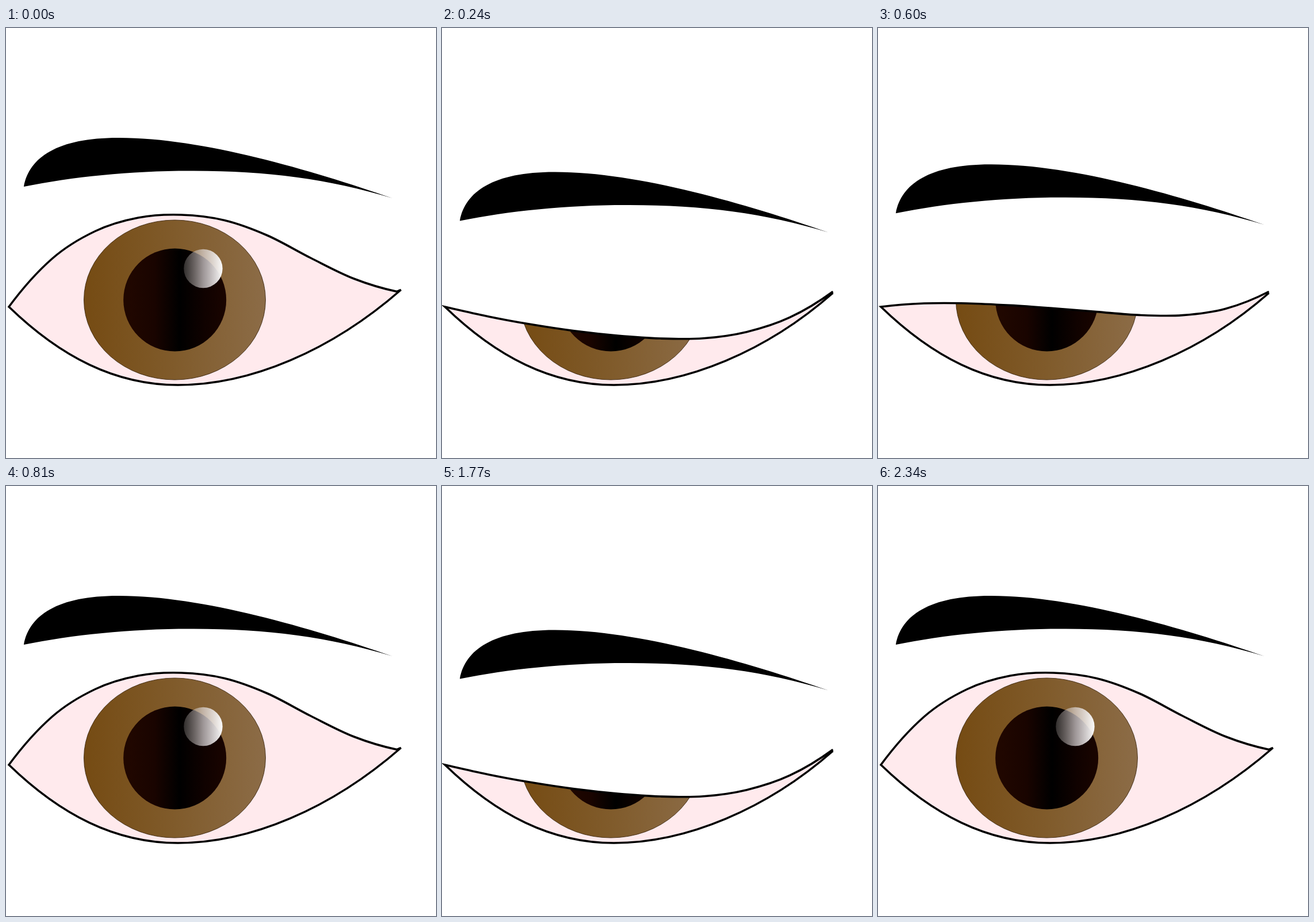
Animation of 748 by 748 pixels, one loop 2850 ms. Source, as an HTML page with a canvas:

```html
<!DOCTYPE html>
<html lang="en">
<head>
<meta charset="utf-8">
<title>Blinking eye</title>
<style>
html, body { margin: 0; height: 100%; overflow: hidden; background: #fff; }
canvas { display: block; }
</style>
</head>
<body>
<canvas id="stage" width="748" height="748"></canvas>
<script>
const ctx = document.getElementById('stage').getContext('2d');
const STEP = 30, LOOP = 2850, SECOND_BLINK = 1530, BROW_DROP = 85.7;

// Upper lid heights at equal distances from the left corner.
const LEFT = 5, GAP = 75;
const OPEN = [485, 401.5, 353.5, 330, 325, 334.5, 361, 400, 436, 458.5];
const SHUT = [484, 545.5, 586.5, 613, 627, 630, 618, 585, 533, 458.5];

const brow = new Path2D(`M31 276C40 225 90 191 195 191C340 190.5 530 247 672 296
  C560 262 450 248 320 248.5C215 248.5 115 259 31 276Z`);

const lowerLid = tip => new Path2D(`M${tip}C565 562 425 621 299 621C190 621 95 572 5 485`);

// How far the lid is down: quick fall, short rest, slower rise.
function closure(n) {
  const p = n < 11 ? n / 11.5 : (27 - n) / 13;
  return Math.max(0, Math.min(1, p));
}

// Smooth curve through the lid heights.
function addUpperLid(path, ys) {
  const last = ys.length - 1;
  const slope = i =>
    i === 0 ? 2 * (ys[1] - ys[0]) - slope(1) :
    i === last ? 2 * (ys[last] - ys[last - 1]) - slope(last - 1) :
    (ys[i + 1] - ys[i - 1]) / 2;
  for (let i = 0; i < last; i++) {
    const x = LEFT + GAP * i;
    path.bezierCurveTo(x + GAP / 3, ys[i] + slope(i) / 3,
      x + GAP * 2 / 3, ys[i + 1] - slope(i + 1) / 3, x + GAP, ys[i + 1]);
  }
}

function ramp(x0, x1, ...colors) {
  const g = ctx.createLinearGradient(x0, 0, x1, 0);
  colors.forEach((c, i) => g.addColorStop(i / (colors.length - 1), c));
  return g;
}

const irisFill = ramp(135, 452, '#754b13', '#805b2b', '#8c6c47');
const pupilFill = ramp(215, 390, '#200700', '#190400', '#000', '#100200', '#1c0500');
const glintFill = ramp(309, 377, 'rgba(190,185,180,.25)', 'rgba(225,220,222,.68)', '#fafafa');

function oval(x, y, rx, ry, fill) {
  ctx.beginPath();
  ctx.ellipse(x, y, rx, ry, 0, 0, Math.PI * 2);
  ctx.fillStyle = fill;
  ctx.fill();
}

function drawEyeball() {
  ctx.fillStyle = '#ffeaed';
  ctx.fillRect(0, 0, 748, 748);
  oval(293.5, 473, 158, 139, irisFill);
  ctx.strokeStyle = '#2b1a05';
  ctx.lineWidth = 0.8;
  ctx.stroke();
  oval(293.7, 473, 89.5, 89.5, pupilFill);
  oval(343, 418.5, 33.7, 33.7, glintFill);
}

// Keeps drawing above the lower lid, moved down by dy.
function clipAbove(tip, dy) {
  const area = lowerLid(tip);
  for (const [x, y] of [[-20, 485], [-20, 0], [748, 0], [748, tip[1]]]) area.lineTo(x, y);
  ctx.translate(0, dy);
  ctx.clip(area);
  ctx.translate(0, -dy);
}

function draw(p) {
  const wide = p === 0;
  const tip = wide ? [687, 455.5] : [680, 461];
  const heights = OPEN.map((y, i) => y + (SHUT[i] - y) * p);

  ctx.fillStyle = '#fff';
  ctx.fillRect(0, 0, 748, 748);

  ctx.save();
  ctx.translate(0, BROW_DROP * p);
  ctx.fillStyle = '#000';
  ctx.fill(brow);
  ctx.restore();

  const outline = lowerLid(tip);
  addUpperLid(outline, heights);
  if (wide) outline.closePath();

  const belowLid = new Path2D(`M${LEFT} ${heights[0]}`);
  addUpperLid(belowLid, heights);
  belowLid.lineTo(...tip);
  belowLid.lineTo(tip[0], 748);
  belowLid.lineTo(LEFT, 748);

  ctx.save();
  clipAbove(tip, 0);
  ctx.clip(belowLid);
  drawEyeball();
  ctx.restore();

  ctx.save();
  clipAbove(tip, 2.8);
  ctx.strokeStyle = '#000';
  ctx.lineWidth = 3.6;
  ctx.miterLimit = 4;
  ctx.stroke(outline);
  ctx.restore();
}

function tick() {
  const t = performance.now() % LOOP;
  draw(closure(Math.floor((t % SECOND_BLINK) / STEP + 1e-4)));
  requestAnimationFrame(tick);
}
tick();
</script>
</body>
</html>
```
